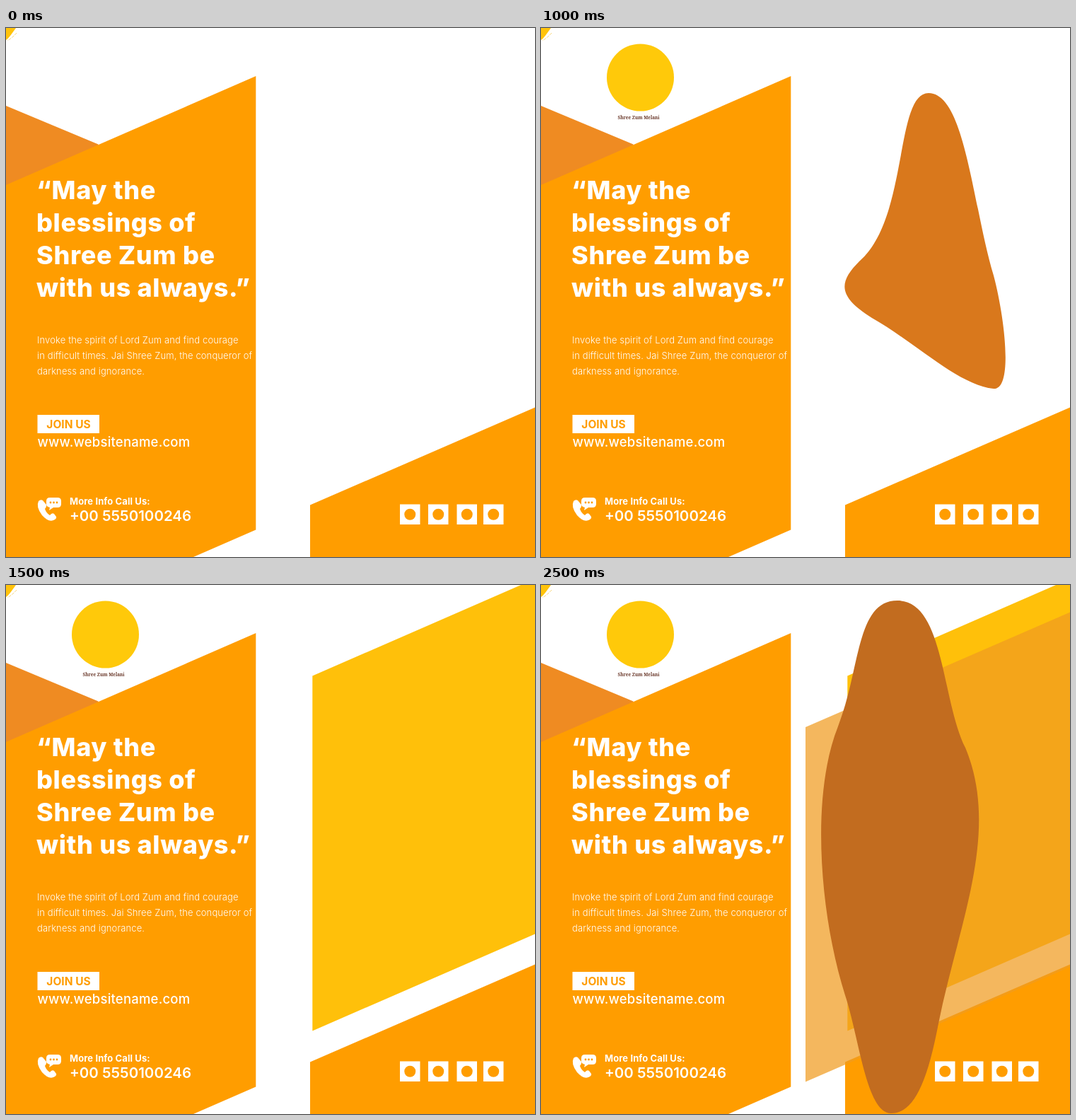
Recreate the animation shown at these times as an HTML page. Size 748 px wide and 748 px high, loop 3 s.

```html
<!DOCTYPE html>
<html lang="en">
<head>
<meta charset="utf-8">
<title>Festival greeting</title>
<style>
  html, body { margin: 0; width: 100%; height: 100%; overflow: hidden; background: #fff; }
  svg { display: block; width: 100vw; height: 100vh; }
  text { font-family: Inter, Roboto, sans-serif; fill: #fff; }
  .quote { font-size: 36px; font-weight: 800; letter-spacing: .65px; }
  .body { font-size: 13px; font-weight: 300; letter-spacing: .12px; }
  .join { font-size: 15.5px; font-weight: 700; fill: #ff9d00; }
  .site { font-size: 18.5px; font-weight: 500; letter-spacing: .2px; }
  .more { font-size: 13px; font-weight: 700; letter-spacing: .1px; }
  .phone { font-size: 20.5px; font-weight: 600; }
  .caption { font: bold 6.4px "Noto Serif", serif; fill: #6b3a2c; }
</style>
</head>
<body>
<svg viewBox="0 0 748 748">
  <rect width="748" height="748" fill="#fff"/>

  <!-- corner brush stroke -->
  <path d="M0 0H14Q9 7 6 11Q3 15 0 17Z" fill="#ffc30a"/>
  <path d="M15 7Q10 13 2 18" fill="none" stroke="#f6cf62" stroke-width=".9" stroke-dasharray="4 1.5"/>

  <!-- panels -->
  <path d="M0 110L130.500 164.500V200L0 240Z" fill="#ef8b22"/>
  <path d="M0 222L353.300 68V709.500L265 748H0Z" fill="#ff9d00"/>
  <path d="M430 674.500L748 536.500V748H430Z" fill="#ff9d00"/>

  <g id="badge">
    <circle cx="140.500" cy="70" r="47.500" fill="#ffc90a"/>
    <text class="caption" x="138" y="129" text-anchor="middle">Shree Zum Melani</text>
  </g>

  <path id="yellow" d="M433.300 128.500L728 0H748V493.500L433.300 630.500Z" fill="#ffc00a"/>
  <path id="glass" d="M374 201L748 38.500V540L374 702.500Z" fill="#f09c21" fill-opacity=".72"/>

  <!-- rounded, tapered shapes -->
  <path id="archer" d="M548 92C600 92 610 250 640 350C656 410 668 512 640 510C590 505 530 445 468 410C420 380 420 360 450 330C520 270 500 92 548 92Z" fill="#d9781c"/>
  <path id="walker" d="M504 22C570 22 566 160 600 230C650 350 590 480 562 620C545 710 525 747 495 747C460 747 450 640 430 580C395 470 380 300 420 200C452 120 445 22 504 22Z" fill="#c26c1f"/>

  <g class="quote">
    <text x="43" y="241.500">“May the</text>
    <text x="43" y="287.500">blessings of</text>
    <text x="43" y="333.500">Shree Zum be</text>
    <text x="43" y="379.500">with us always.”</text>
  </g>
  <g class="body">
    <text x="44" y="446">Invoke the spirit of Lord Zum and find courage</text>
    <text x="44" y="468">in difficult times. Jai Shree Zum, the conqueror of</text>
    <text x="44" y="490">darkness and ignorance.</text>
  </g>

  <rect x="44.500" y="547" width="87.500" height="26" fill="#fff"/>
  <text class="join" x="88.500" y="566" text-anchor="middle">JOIN US</text>
  <text class="site" x="44.500" y="592">www.websitename.com</text>

  <!-- handset with speech bubble -->
  <path d="M46 669Q49 666 52 668L57 674Q58 676 55 680Q57 686 62 689Q65 685 68 687L71 691Q72 694 67 696Q60 699 51 689Q42 677 46 669Z" fill="#fff"/>
  <path d="M62 664H73Q78 664 78 669V673Q78 678 73 678H67L61 682L62 678Q57 677 57 673V669Q57 664 62 664Z" fill="#fff"/>
  <g fill="#ff9d00">
    <circle cx="63" cy="671" r="1.400"/>
    <circle cx="67.500" cy="671" r="1.400"/>
    <circle cx="72" cy="671" r="1.400"/>
  </g>
  <text class="more" x="90" y="674">More Info Call Us:</text>
  <text class="phone" x="90" y="697">+00 5550100246</text>

  <g id="social"></g>
</svg>
<script>
  const LOOP = 3000;
  const svgNS = "http://www.w3.org/2000/svg";
  const byId = id => document.getElementById(id);

  // Visible interval of each layer, in ms
  const layers = {
    badge: [500, LOOP],
    archer: [1000, 1500],
    yellow: [1500, LOOP],
    glass: [2000, LOOP],
    walker: [2500, LOOP]
  };

  function add(parent, tag, attrs) {
    const node = document.createElementNS(svgNS, tag);
    for (const key in attrs) node.setAttribute(key, attrs[key]);
    parent.appendChild(node);
  }

  for (const x of [557, 597, 637.5, 675]) {
    add(byId("social"), "rect", { x, y: 673.5, width: 28.5, height: 28.5, fill: "#fff" });
    add(byId("social"), "circle", { cx: x + 14.25, cy: 687.75, r: 8, fill: "#ff9d00" });
  }

  function draw(t) {
    for (const id in layers) {
      const [from, to] = layers[id];
      byId(id).style.display = t >= from && t < to ? "" : "none";
    }
  }

  const start = performance.now();
  function tick() {
    draw((performance.now() - start) % LOOP);
    requestAnimationFrame(tick);
  }
  draw(0);
  requestAnimationFrame(tick);
</script>
</body>
</html>
```
